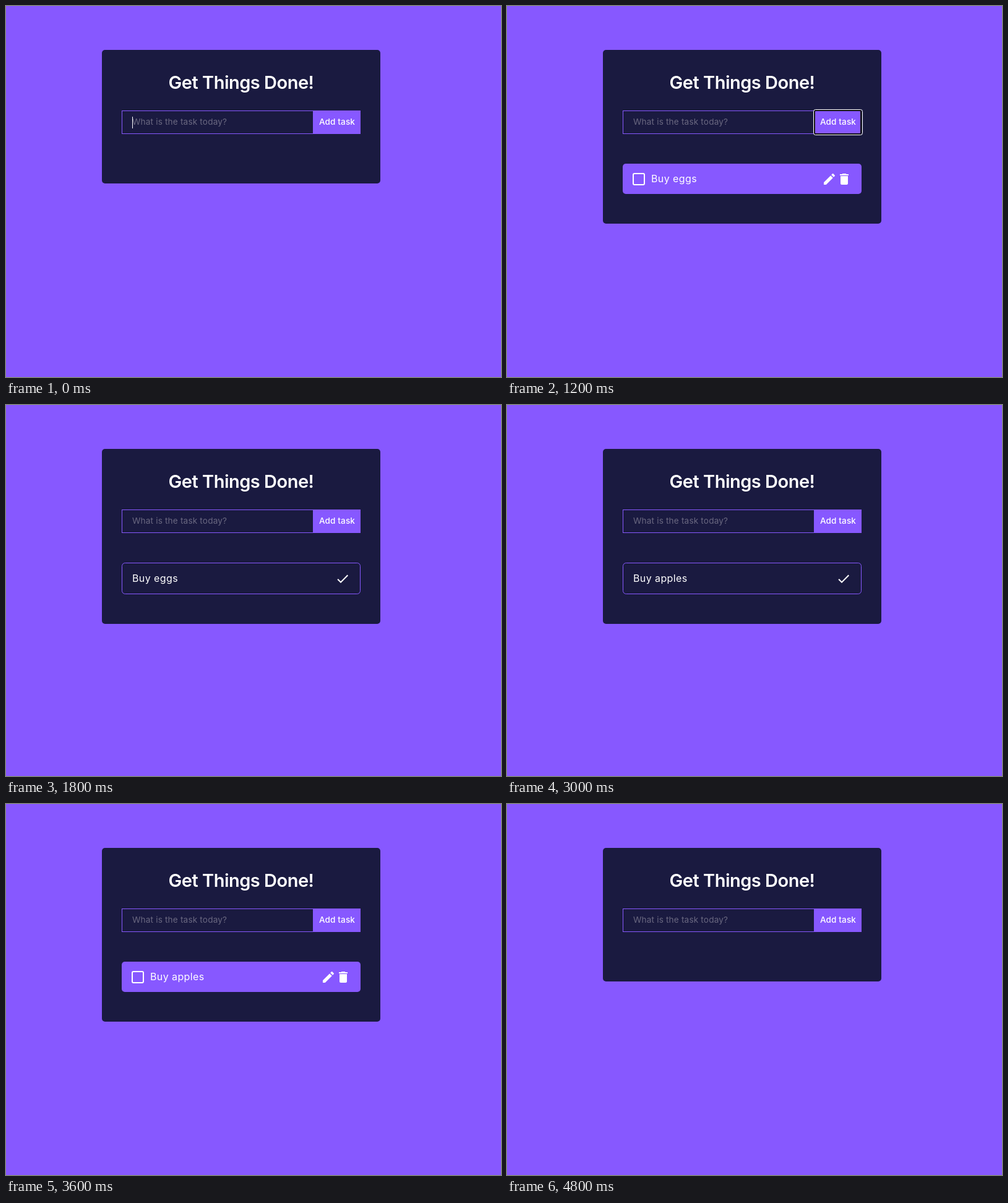
These frames come from a looping animation (800 by 600 pixels, 5400 ms). An HTML page:

```html
<!DOCTYPE html>
<html lang="en">
<head>
<meta charset="utf-8">
<title>To-do list</title>
<style>
  html, body { margin: 0; height: 100%; overflow: hidden; background: #8758ff; }
  svg { display: block; width: 800px; height: 600px; }
  text { font: 13.6px Inter, "Open Sans", sans-serif; letter-spacing: .17px; fill: #fff; }
  .title { font-size: 29px; font-weight: 600; letter-spacing: -.5px; text-anchor: middle; }
  .button { font-weight: 500; letter-spacing: .1px; text-anchor: middle; }
  .task { font-size: 16px; letter-spacing: .4px; }
  .placeholder { fill: #6a6880; }
  .done { text-decoration: line-through; }
  .purple { fill: #8758ff; }
  .field { fill: none; stroke: #8758ff; }
  .icon { fill: #fff; }
  .line { fill: none; stroke: #fff; stroke-width: 2; }
</style>
</head>
<body>
<svg viewBox="0 0 800 600">
  <rect id="panel" x="155" y="71" width="450" rx="5" fill="#1a1a40"/>
  <text class="title" x="380" y="134">Get Things Done!</text>
  <rect class="field" x="187.5" y="169.5" width="309" height="37"/>
  <text id="entry" x="204" y="192"></text>
  <rect id="caret" x="204" y="179" width="1" height="19" fill="#fff"/>
  <rect class="purple" x="496" y="169" width="77" height="38"/>
  <g id="focus" fill="none">
    <rect x="497" y="169" width="75" height="38" rx="2" stroke="#101010" stroke-width="2"/>
    <rect x="495.5" y="167.5" width="79" height="41" rx="3" stroke="#fff"/>
  </g>
  <text class="button" x="535" y="192">Add task</text>

  <g id="item">
    <rect class="purple" x="187" y="255" width="386" height="49" rx="5"/>
    <rect class="line" x="204" y="271" width="18" height="18" rx="2"/>
    <path id="check" class="line" d="M208.5 281l3.5 4.5 5.5-11"/>
    <text id="itemText" class="task" x="233" y="285"></text>
    <path class="icon" transform="translate(509 268)" d="M3 17.25V21h3.75L17.81 9.94l-3.75-3.75zM20.71 7.04a1 1 0 0 0 0-1.41l-2.34-2.34a1 1 0 0 0-1.41 0l-1.83 1.83 3.75 3.75z"/>
    <path class="icon" transform="translate(533 268)" d="M6 19c0 1.1.9 2 2 2h8c1.1 0 2-.9 2-2V7H6zM19 4h-3.5l-1-1h-5l-1 1H5v2h14z"/>
  </g>

  <g id="edit">
    <rect class="field" x="187.5" y="255.5" width="385" height="50" rx="5"/>
    <text id="editText" class="task" x="204" y="286"></text>
    <path class="icon" transform="translate(532 269)" d="M9 16.17 4.83 12l-1.42 1.41L9 19 21 7l-1.41-1.41z"/>
  </g>
</svg>
<script>
const STEP = 600;
const scenes = [
  { caret: true },
  { entry: "Buy eggs" },
  { item: "Buy eggs", focus: true },
  { edit: "Buy eggs" },
  { edit: "Buy" },
  { edit: "Buy apples" },
  { item: "Buy apples" },
  { item: "Buy apples", done: true },
  {}
];
const byId = id => document.getElementById(id);
const show = (id, visible) => byId(id).setAttribute("display", visible ? "inline" : "none");

function draw(scene) {
  byId("panel").setAttribute("height", scene.edit ? 283 : scene.item ? 281 : 216);
  byId("entry").textContent = scene.entry || "What is the task today?";
  byId("entry").classList.toggle("placeholder", !scene.entry);
  byId("itemText").textContent = scene.item || "";
  byId("itemText").classList.toggle("done", !!scene.done);
  byId("editText").textContent = scene.edit || "";
  show("caret", scene.caret);
  show("focus", scene.focus);
  show("item", scene.item);
  show("check", scene.done);
  show("edit", scene.edit);
}

let current;
const start = performance.now();
function tick() {
  const scene = scenes[Math.floor((performance.now() - start) / STEP) % scenes.length];
  if (scene !== current) draw(current = scene);
  requestAnimationFrame(tick);
}
tick();
</script>
</body>
</html>
```
